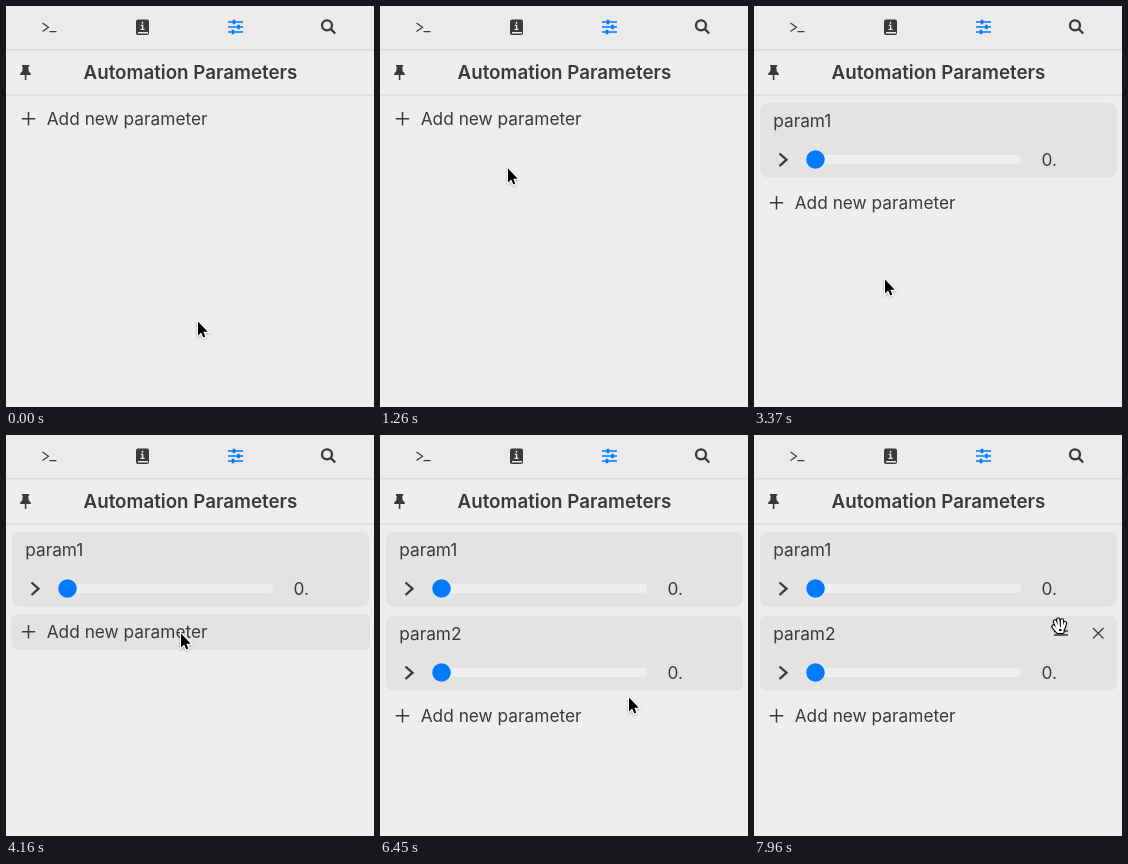
Write an HTML page that moves like this. It is 368 px wide and 401 px high and loops after 8 s.

```html
<!DOCTYPE html>
<html lang="en">
<head>
<meta charset="utf-8">
<title>Automation Parameters</title>
<style>
  html, body { margin: 0; width: 100%; height: 100%; overflow: hidden; background: #eee; }
  svg { display: block; width: 368px; height: 401px; }
  text { font: 17.3px Inter, sans-serif; fill: #3a3a3a; }
  .title { font-size: 18.75px; font-weight: 600; text-anchor: middle; }
  .line { fill: none; stroke: #3a3a3a; stroke-width: 1.5; }
  .thin { stroke-width: 1.2; }
  .thick { stroke-width: 2.3; }
  .dark { fill: #3a3a3a; }
  .panel { fill: #e3e3e3; }
  .blue { fill: #007aff; }
</style>
</head>
<body>
<svg viewBox="0 0 368 401">
  <defs>
    <filter id="shadow" x="-50%" y="-50%" width="200%" height="200%">
      <feDropShadow dx="0" dy="1" stdDeviation="1" flood-opacity=".3"/>
    </filter>
    <g id="param">
      <rect class="panel" x="6" y="97" width="357" height="74.5" rx="7.5"/>
      <path class="line thick" d="M25.5 147.5l7 6.2l-7 6.3"/>
      <rect x="52" y="149" width="215" height="9" rx="4" fill="#efefef"/>
      <circle class="blue" cx="61.5" cy="153.5" r="9.3"/>
      <text x="287.5" y="160">0.</text>
    </g>
    <g id="tools" class="line">
      <path d="M300 112h14m-14 4h14"/>
      <path class="thin" d="M339 109l10.5 10.5m0 -10.5l-10.5 10.5"/>
    </g>
    <path id="slider" d="M222 0h15M227 -2.3v4.6" stroke="#007aff" stroke-width="1.6"/>
    <path id="fingers" d="M6 14L2.5 9.5M6 10L4 4.5M8 10L7.3 2.5M11 10V3.3M12.5 11L14 6.2M7 11h4.5v4h-4.5z"/>
  </defs>

  <rect width="368" height="401" fill="#eee"/>
  <rect width="368" height="43" fill="#ebebeb"/>
  <path d="M0 43.8H368M0 89H368" stroke="#dcdcdc" stroke-width="1.5"/>

  <path class="line thin" d="M36.5 17l6 4.2l-6 4.2M43.5 25.6h7"/>
  <rect class="dark" x="130" y="13.5" width="13" height="15.5" rx="2"/>
  <path d="M136.5 15.8v2M134.8 19.4h1.8v4M134.5 23.4h4M132 26.7h10" fill="none" stroke="#ebebeb" stroke-width="1.4"/>
  <g>
    <path d="M222 16h15m-15 5h15m-15 5h15" stroke="#007aff" stroke-width="1.6"/>
    <path d="M228 13.7v4.6M232.5 18.7v4.6M227 23.7v4.6" stroke="#007aff" stroke-width="2.6"/>
  </g>
  <circle class="line thick" cx="321" cy="19.3" r="5"/>
  <path class="line thick" d="M324.6 22.9l4.6 4.6"/>
  <path class="dark" d="M16 59h7.2v1.8h-1l.6 4.7q2.2 1 2.2 3.5h-4.6v5h-1.6v-5h-4.8q0 -2.5 2.2 -3.5l.6 -4.7h-.8z"/>
  <text class="title" x="184.4" y="73">Automation Parameters</text>

  <g id="param1"><use href="#param"/><text x="19.2" y="121">param1</text></g>
  <g id="param2" transform="translate(0 84)"><use href="#param"/><text x="19.2" y="121">param2</text></g>
  <use id="tools1" href="#tools"/>
  <use id="tools2" href="#tools" y="84"/>

  <g id="add">
    <rect id="addHover" class="panel" x="5" y="95" width="359.5" height="36" rx="7.5"/>
    <path class="line" d="M15.8 112.7h13.4m-6.7 -6.7v13.4"/>
    <text x="40.7" y="119.2">Add new parameter</text>
  </g>

  <g id="tooltip">
    <rect x="-120" y="226.5" width="278" height="35" rx="7.5" fill="#ebebeb" stroke="#c9c9c9" filter="url(#shadow)"/>
    <text x="142.5" y="250" text-anchor="end">Drag to add [param] to canvas</text>
  </g>

  <g id="cursor" filter="url(#shadow)">
    <path id="arrow" d="M0 .5v14l3.2 -3l2.1 4.9l2 -.9l-2 -4.8h4.4z" stroke="#fff" stroke-width="2" paint-order="stroke"/>
    <g id="hand" transform="translate(-8 -9)" stroke-linecap="round" stroke-linejoin="round">
      <use href="#fingers" stroke="#000" stroke-width="4.2"/>
      <use href="#fingers" stroke="#fff" stroke-width="2.2"/>
    </g>
  </g>
</svg>
<script>
  const LOOP = 8000, ROW = 84, ADD_FIRST = 2380, ADD_SECOND = 4680;
  const HOME = [192, 315];

  // Each gesture is a quadratic curve to a point, pulled towards its bend.
  const gestures = [
    { from: 460, until: 1260, to: [128, 162], bend: [130, 242] },
    { from: 1260, until: 1860, to: [127, 114], bend: [126, 114] },
    { from: 2940, until: 3370, to: [131, 273], bend: [127, 200] },
    { from: 3370, until: 3740, to: [234, 245], bend: [150, 305] },
    { from: 3830, until: 4160, to: [175, 198], bend: [190, 198] },
    { from: 5160, until: 5420, to: [179, 225], bend: [176, 207] },
    { from: 5650, until: 5720, to: [182, 234], bend: [180, 230] },
    { from: 5980, until: 6760, to: [291, 246], bend: [240, 284] },
    { from: 6800, until: 7610, to: [280, 188], bend: [248, 189] },
    { from: 7610, until: 7960, to: [305, 191], bend: [292, 188] }
  ];

  const el = id => document.getElementById(id);
  const show = (id, on) => el(id).setAttribute("visibility", on ? "visible" : "hidden");
  const move = (id, x, y) => el(id).setAttribute("transform", `translate(${x} ${y})`);
  const between = (v, from, to) => v >= from && v < to;

  function pointerAt(t) {
    let point = HOME;
    for (const { from, until, to, bend } of gestures) {
      if (t < from) break;
      const p = Math.min(1, (t - from) / (until - from)), q = 1 - p;
      point = point.map((v, i) => q * q * v + 2 * q * p * bend[i] + p * p * to[i]);
    }
    return point.map(Math.round);
  }

  function draw(t) {
    const [x, y] = pointerAt(t);
    const count = (t >= ADD_FIRST) + (t >= ADD_SECOND);
    const addOffset = count * ROW;
    const grabbing = t > 7610 && x >= 293;

    show("param1", count > 0);
    show("param2", count > 1);
    show("tools1", count > 0 && between(y, 97, 171));
    show("tools2", between(t, ADD_SECOND, 5630) || t >= 6810);
    show("tooltip", between(t, 5420, 5700));
    move("add", 0, addOffset);
    show("addHover", between(y - addOffset, 95, 131));
    move("cursor", x, y);
    show("arrow", !grabbing);
    show("hand", grabbing);
  }

  const start = performance.now();
  function tick() {
    draw((performance.now() - start) % LOOP);
    requestAnimationFrame(tick);
  }
  tick();
</script>
</body>
</html>
```
